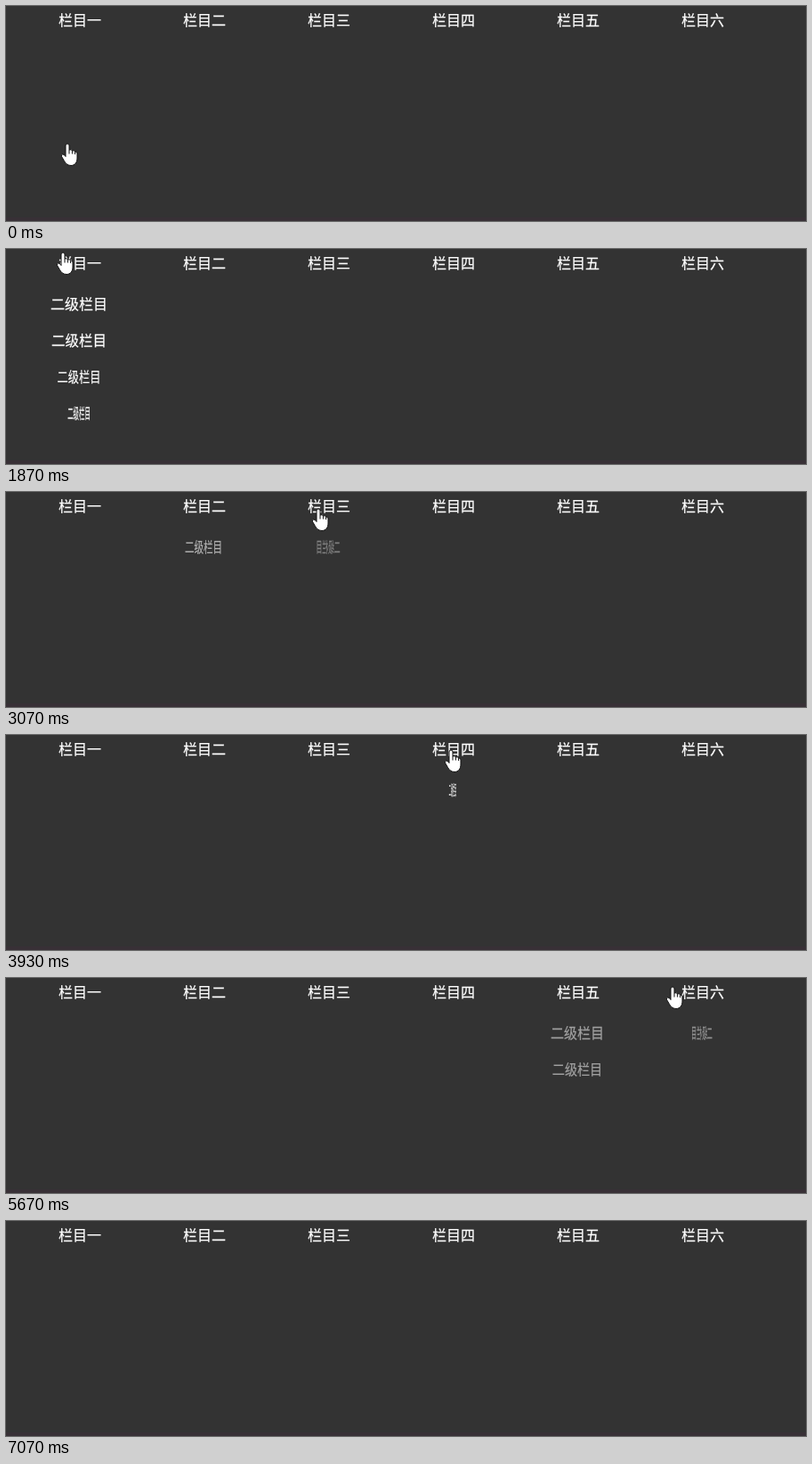
Recreate the animation shown at these times as an HTML page. Size 899x242 px, loop 7540 ms.

```html
<!DOCTYPE html>
<html lang="zh-CN">
<head>
<meta charset="utf-8">
<title>栏目</title>
<style>
  html, body { margin: 0; width: 100%; height: 100%; overflow: hidden; background: #333; }
  svg { display: block; width: 899px; height: 242px; }
  text {
    font: 16px "Noto Sans CJK SC", "Noto Sans CJK", sans-serif;
    fill: #fff; stroke: #fff; stroke-width: .25; text-anchor: middle;
  }
</style>
</head>
<body>
<svg viewBox="0 0 899 242">
  <rect width="899" height="242" fill="#333"/>
  <rect y="238" width="899" height="4" fill="#383036"/>
  <g id="menu"></g>
  <g id="hand" stroke="#111" stroke-linejoin="round">
    <path fill="#fff" d="M-2 2Q-2 0 0 0T2 2V7Q4.5 5.8 5.4 8Q7.8 7 8.6 9Q11 8.6 11 11V16C11 21 8.5 24.5 4 24.5C0 24.5 -2 22 -3.5 19.5L-6.4 14.5Q-7 12.4 -5.4 12T-2 14.5Z"/>
    <path fill="none" d="M2 7V11.5M5.4 8V11.5M8.6 9V12"/>
  </g>
</svg>
<script>
const LOOP = 7540, FRAME = 200 / 3;
const HIDDEN = 130, SPIN = 1000, FADE = 300, STAGGER = 200;
const GLIDE = 360, SETTLE = 120, EXIT = 6300, GONE = 7060;

// Each column is hovered until the next one starts.
const columns = [
  { name: "一", rows: 4, start: 780, rest: [64, 4] },
  { name: "二", rows: 1, start: 2215, rest: [215, 22] },
  { name: "三", rows: 1, start: 2955, rest: [351, 19] },
  { name: "四", rows: 1, start: 3565, rest: [500, 17] },
  { name: "五", rows: 2, start: 4545, rest: [622, 12] },
  { name: "六", rows: 1, start: 5530, rest: [749, 10] }
];

const menu = document.getElementById("menu");
const hand = document.getElementById("hand");
const clamp = v => Math.min(1, Math.max(0, v));
const smooth = f => f * f * (3 - 2 * f);
const mix = (p, q, f) => p.map((v, k) => v + (q[k] - v) * f);

function addText(str, x, y) {
  const el = document.createElementNS("http://www.w3.org/2000/svg", "text");
  el.textContent = str;
  el.setAttribute("x", x);
  el.setAttribute("y", y);
  menu.append(el);
  return el;
}

columns.forEach((col, i) => {
  addText("栏目" + col.name, 83 + 140 * i, 22);
  col.x = 82 + 140 * i;
  col.items = Array.from({ length: col.rows }, () => addText("二级栏目", 0, 0));
  const next = columns[i + 1];
  col.spans = [[col.start, next ? next.start : EXIT + 50]];
});
// The pointer brushes the first submenu as it leaves on the left.
columns[0].spans.unshift([10, 130]);

// Linear transition that runs back from wherever the hover ended.
function progress(span, t, length, delay) {
  if (!span) return 0;
  const [a, b] = span;
  const up = clamp((Math.min(t, b) - a - delay) / length);
  return clamp(up - Math.max(0, t - b - delay) / length);
}

function pointer(t) {
  if (t <= 200) return mix([69, 155], [21, 163], t / 200);
  if (t < 730 || t > GONE) return null;
  let pos = columns[0].rest;
  for (const { start, rest } of columns.slice(1)) {
    pos = mix(pos, rest, smooth(clamp((t - start - SETTLE) / GLIDE + 1)));
  }
  // Drops away first, then sweeps left off the bottom edge.
  const f = clamp((t - EXIT) / (GONE - EXIT));
  return [pos[0] - 640 * f * f, pos[1] + 235 * f * (2 - f)];
}

function draw(t) {
  for (const col of columns) {
    const span = col.spans.filter(s => s[0] <= t).pop();
    const alpha = progress(span, t, FADE, 0);
    col.items.forEach((el, row) => {
      const angle = HIDDEN * (1 - progress(span, t, SPIN, STAGGER * row));
      const sx = Math.cos(angle * Math.PI / 180);
      el.setAttribute("transform", `translate(${col.x} ${68 + 41 * row}) scale(${sx.toFixed(4)} 1)`);
      el.setAttribute("opacity", alpha.toFixed(3));
    });
  }
  const tip = pointer(t);
  hand.setAttribute("visibility", tip ? "visible" : "hidden");
  if (tip) hand.setAttribute("transform", `translate(${tip.map(Math.round)})`);
}

function tick() {
  const t = performance.now() % LOOP;
  // The picture advances fifteen times a second, on whole 10 ms marks.
  const step = Math.floor((t + 3.4) / FRAME);
  draw(Math.round(step * FRAME / 10) * 10);
  requestAnimationFrame(tick);
}
tick();
</script>
</body>
</html>
```
